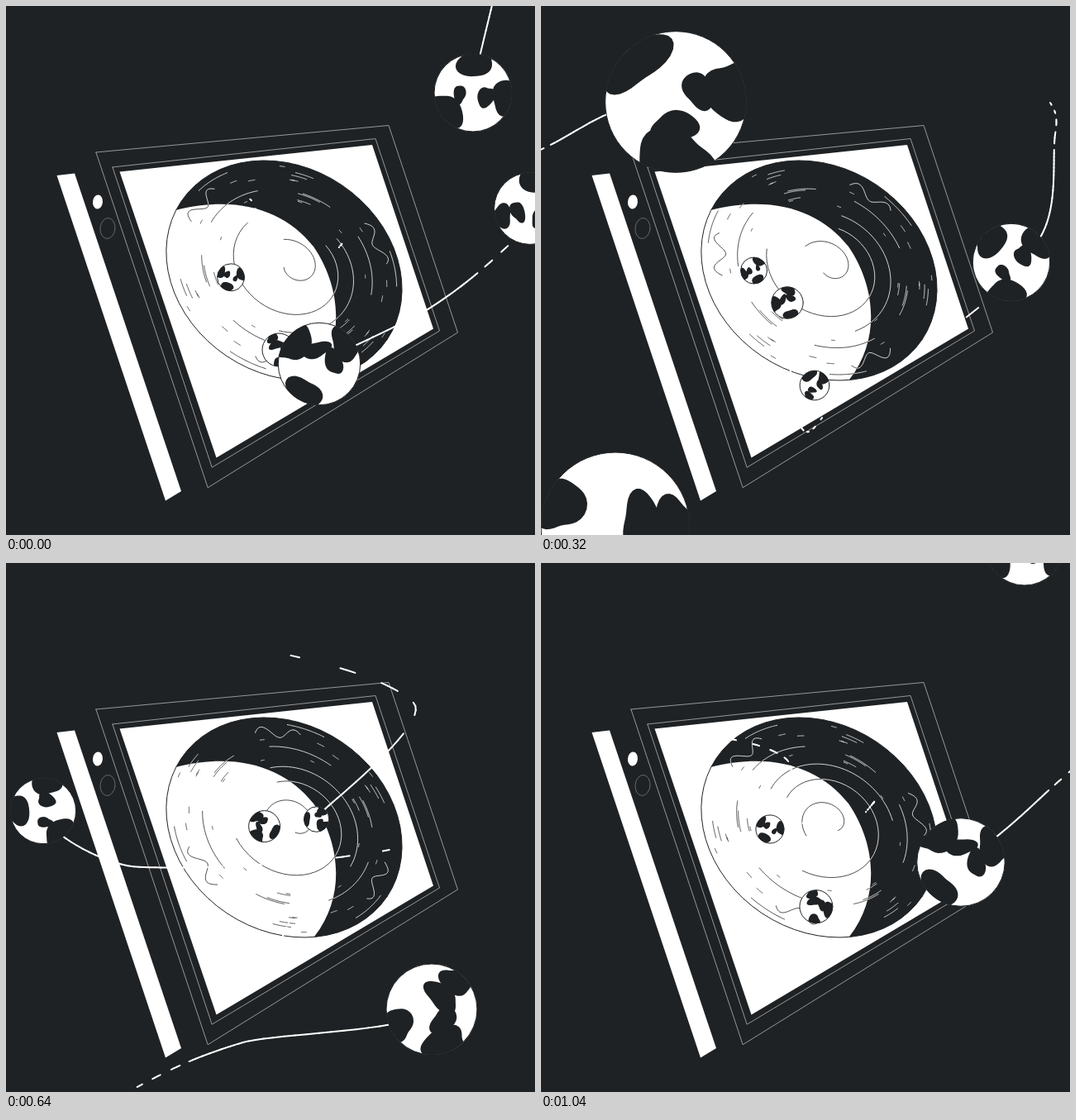
Animation, 640 px wide and 640 px high, one loop 1.12 s. Source, as an HTML page with a canvas:

```html
<!DOCTYPE html>
<html>
<head>
<meta charset="utf-8">
<style>
html, body { margin: 0; height: 100%; overflow: hidden; background: #1f2224 }
canvas { display: block }
</style>
</head>
<body>
<canvas id="stage" width="640" height="640"></canvas>
<script>
const g = document.getElementById('stage').getContext('2d');
const DARK = '#1f2224', WHITE = '#fff', GREY = '#c8c9ca', TAU = Math.PI * 2;
const STEP = 80, COUNT = 14;

// Each moon flies along its path [step, x, y] and shrinks as it falls into the screen.
const moons = [
  {
    big: 47, small: 16, shrink: 9.3, pace: .9, seed: 5,
    path: [[-1, 585, -20], [0, 565, 105], [2, 600, 165], [4, 569, 310], [7, 167, 366],
      [8, 45, 300], [9, 157, 228], [11, 298, 243], [13, 277, 322], [19, 254, 318]]
  },
  {
    big: 54, small: 19, shrink: 15.1, pace: 1.8, seed: 21,
    path: [[9, 653, 207], [11, 604, 268], [13, 508, 362], [14, 379, 433], [16, 316, 497],
      [18, 298, 359], [21, 310, 323], [26, 321, 313]]
  },
  {
    big: 44, small: 13, shrink: 2.8, pace: 1.4, seed: 34,
    path: [[-1, 720, 130], [0, 634, 245], [2, 407, 440], [4, 331, 459], [8, 365, 385]]
  },
  {
    big: 90, small: 20, shrink: 8, pace: 2, seed: 13,
    path: [[3, -60, 650], [4, 90, 630], [7, 288, 570], [8, 515, 540], [9, 412, 429],
      [11, 343, 416], [14, 330, 416], [16, 307, 413], [17, 285, 400]]
  },
  {
    big: 118, small: 14, shrink: 4.6, pace: 1.3, seed: 8,
    path: [[2, 10, 190], [4, 163, 116], [6, 480, 180], [7, 383, 299], [12, 400, 290]]
  }
];

function seeded(s) {
  return () => (s = (s * 16807) % 2147483647) / 2147483647;
}

// smooth curve through the path, with tangents taken from the neighbours
function locate(path, t) {
  let i = 0;
  while (i < path.length - 2 && t > path[i + 1][0]) i++;
  const a = path[i], b = path[i + 1], h = b[0] - a[0], u = (t - a[0]) / h;
  const before = path[i - 1] || a, after = path[i + 2] || b;
  return [1, 2].map(c => {
    const m = (b[c] - before[c]) / (b[0] - before[0]) * h;
    const n = (after[c] - a[c]) / (after[0] - a[0]) * h;
    const d = b[c] - a[c];
    return a[c] + u * (m + u * (3 * d - 2 * m - n + u * (m + n - 2 * d)));
  });
}

function radius({ big, small, shrink, pace }, t) {
  return small + (big - small) / (1 + Math.exp((t - shrink) * pace));
}

function paint(fill, stroke, width) {
  if (fill) { g.fillStyle = fill; g.fill(); }
  if (stroke) { g.strokeStyle = stroke; g.lineWidth = width; g.stroke(); }
}

function shape(points, fill, stroke, width = .7, closed = true) {
  g.beginPath();
  points.forEach(p => g.lineTo(...p));
  if (closed) g.closePath();
  paint(fill, stroke, width);
}

function line(points, color, width) {
  shape(points, null, color, width, false);
}

function oval(x, y, rx, ry, tilt, fill, stroke, width = 1) {
  g.beginPath();
  g.ellipse(x, y, rx, ry, tilt, 0, TAU);
  paint(fill, stroke, width);
}

function tablet() {
  shape([[61.5, 205], [83, 202.5], [212, 587], [193, 598.5]], WHITE);
  shape([[108.5, 177], [463, 144.5], [546.5, 395], [244.5, 582.5]], null, GREY);
  shape([[128.5, 195], [447, 160.5], [524.5, 393], [249.5, 558]], null, GREY);
  shape([[137.5, 200.5], [443, 168], [517, 390.5], [254.5, 546.5]], WHITE);
  oval(111, 237, 6, 8.5, .1, WHITE);
  oval(123, 269, 9, 12.5, .1, null, '#777a7b', .8);
}

// point on the globe: k = distance from the pole, a = longitude
function onGlobe(k, a) {
  const x = 150 * k * Math.cos(a), y = 124.7 * k * Math.sin(a);
  const c = Math.cos(.59), s = Math.sin(.59);
  return [336.5 + 14 * (1 - k) + x * c - y * s, 320 - 8 * (1 - k) + x * s + y * c];
}

function globeLine(a, span, height, color) {
  const points = [];
  for (let i = 0; i <= 40; i++) points.push(onGlobe(height(i / 40), a + span * i / 40));
  line(points, color, .8);
}

function globeLines(turn, color) {
  const rnd = seeded(77);
  globeLine(turn + 2.2, -4.6, u => .1 + .14 * u, color);
  globeLine(turn + 3.4, -4.6, u => .5 - .12 * u, color);
  globeLine(turn + 1.2, -2.4, u => .6 - .08 * u, color);
  for (let i = 0; i < 15; i++) {
    const k = .6 + .36 * rnd(), a = rnd() * TAU, span = .04 + .3 * rnd() ** 2;
    for (let j = 0; j < 3; j++) globeLine(turn + a + j * TAU / 3, span, () => k, color);
  }
  for (let j = 0; j < 3; j++) {
    const a = turn + j * TAU / 3;
    globeLine(a + 3, .45, u => .86 + .05 * Math.sin(u * 9), color);
    globeLine(a + 1, .75, () => .72, color);
  }
}

function globe(n) {
  const turn = -n / COUNT * TAU / 3;
  g.save();
  oval(336.5, 320, 150, 124.7, .59, WHITE);
  g.clip();
  globeLines(turn, DARK);
  g.beginPath();
  g.moveTo(205, 247);
  g.bezierCurveTo(280, 228, 337, 247, 372, 291);
  g.bezierCurveTo(404, 338, 412, 402, 373, 452);
  g.lineTo(520, 500);
  g.lineTo(520, 150);
  g.lineTo(180, 150);
  paint(DARK);
  g.clip();
  globeLines(turn, WHITE);
  g.restore();
  oval(336.5, 320, 150, 124.7, .59, null, DARK);
}

// the trail drifts outwards and breaks into dashes with age
function trail(path, t) {
  const first = path[0][0], last = path[path.length - 1][0];
  const at = time => {
    const grow = 1 + .04 * (t - time);
    return locate(path, time).map(v => 320 + (v - 320) * grow);
  };
  for (let i = Math.ceil(Math.max(first, t - 4) * 20); i < Math.min(last, t) * 20; i++) {
    const time = i / 20, gap = (t - time - 1.6) / 2.2;
    if (gap > 0 && .5 + .5 * Math.sin(time * 19) < gap + .3) continue;
    line([at(time), at(Math.min(t, time + .05))], WHITE, 2);
  }
}

function blob(x, rx, ry, seed) {
  const points = [];
  for (let i = 0; i < 36; i++) {
    const a = i / 36 * TAU;
    const w = 1 + .12 * Math.sin(2 * a + seed) + .1 * Math.sin(3 * a + seed * 2);
    points.push([x + rx * w * Math.cos(a), ry * w * Math.sin(a)]);
  }
  shape(points, DARK);
}

// dark patches: three along the rim, two smaller ones further in
function ball({ seed, t, x, y, r }) {
  const rnd = seeded(seed * 9973);
  g.save();
  g.translate(x, y);
  oval(0, 0, r, r, 0, WHITE);
  g.save();
  g.clip();
  g.rotate(t * -.2);
  for (let i = 0; i < 5; i++) {
    const rim = i < 3, size = r * (rim ? .26 + .14 * rnd() : .14 + .12 * rnd());
    g.save();
    g.rotate(i * TAU / 3 + rnd());
    blob(r * (rim ? .8 : .35), size, size * (1.2 + .5 * rnd()), seed + i);
    g.restore();
  }
  g.restore();
  oval(0, 0, r, r, 0, null, DARK);
  g.restore();
}

function draw(n) {
  g.fillStyle = DARK;
  g.fillRect(0, 0, 640, 640);
  g.lineCap = g.lineJoin = 'round';
  tablet();
  globe(n);

  const balls = [];
  for (const moon of moons) {
    const first = moon.path[0][0], last = moon.path[moon.path.length - 1][0];
    for (const t of [n - COUNT, n, n + COUNT]) {
      if (t < first || t > last + 4) continue;
      trail(moon.path, t);
      if (t >= last) continue;
      const [x, y] = locate(moon.path, t);
      balls.push({ seed: moon.seed, t, x, y, r: radius(moon, t) });
    }
  }
  balls.sort((a, b) => a.r - b.r).forEach(ball);
}

function tick() {
  draw(Math.floor(performance.now() / STEP) % COUNT);
  requestAnimationFrame(tick);
}
tick();
</script>
</body>
</html>
```
